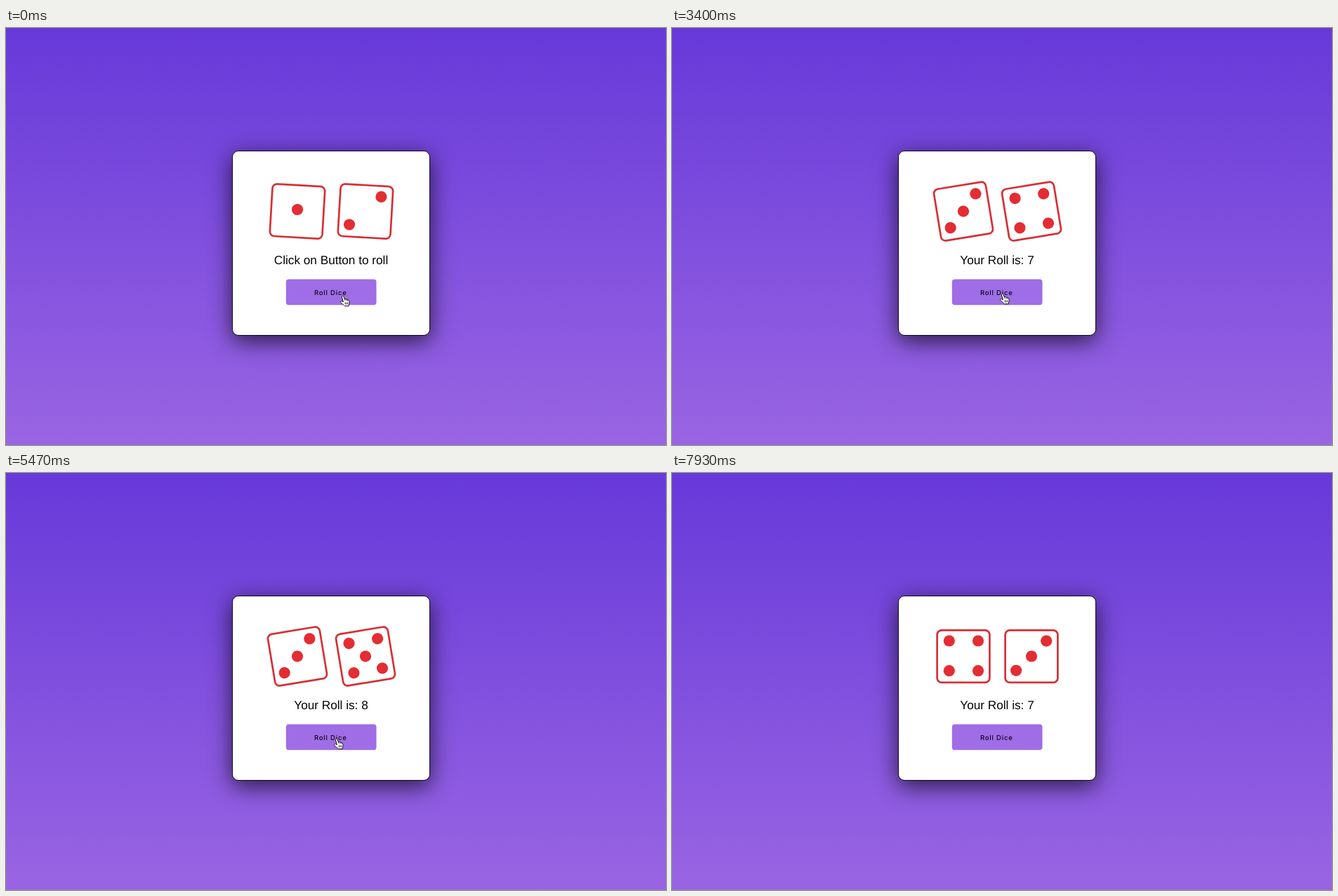
Write an HTML page that moves like this. It is 940 px wide and 595 px high and loops after 8000 ms.

```html
<!DOCTYPE html>
<html lang="en">
<head>
<meta charset="utf-8">
<title>Roll Dice</title>
<style>
  html, body { margin: 0; width: 100%; height: 100%; overflow: hidden; }
  body { position: relative; background: linear-gradient(#6739d9, #9965e3); }
  .card {
    position: absolute; left: 322px; top: 175px; width: 282px; height: 264px;
    box-sizing: border-box; border: 1.5px solid #120a1e; border-radius: 9px;
    background: #fff; box-shadow: 0 8px 32px rgba(0, 0, 0, .7);
  }
  svg { position: absolute; left: 0; top: 0; }
  text { text-rendering: geometricPrecision; }
  .result { font: 17.2px "Liberation Sans", Arial, sans-serif; text-anchor: middle; fill: #050308; }
  .label { font: 500 9.5px Inter, sans-serif; letter-spacing: .8px; fill: #0c0616; }
  .die rect { fill: #fff; stroke: #d53036; stroke-width: 2.7; }
  .die circle { fill: #e32d33; }
  .cursor path { stroke-linejoin: round; stroke-linecap: round; }
</style>
</head>
<body>
<div class="card"></div>
<svg width="940" height="595" viewBox="0 0 940 595">
  <g class="die"><rect x="-37.4" y="-37.2" width="74.8" height="74.6" rx="6.5"/><g></g></g>
  <g class="die"><rect x="-37.4" y="-37.2" width="74.8" height="74.6" rx="6.5"/><g></g></g>
  <text class="result" x="463" y="337"></text>
  <rect x="398.8" y="358.4" width="128.7" height="36.8" rx="4" fill="#9f6de6"/>
  <text class="label" x="439" y="380.8">Roll Dice</text>
  <g class="cursor">
    <g id="hand">
      <path transform="translate(-4.3 -.8)" fill="#fff" stroke="#111" d="M2.6 2.2C2.5.8 4.4.3 5 1.6L6.6 5.6C7.4 4.9 8.5 5.2 8.9 6 9.7 5.5 10.7 5.9 11 6.8 12 6.5 12.8 7 13 8 13.6 10 13.4 11.5 12.8 13L12.6 15.5H6.6C5.4 14 2.6 12 1 10.2.2 9 1.5 8 2.6 8.6L4.4 9.4Z"/>
      <path transform="translate(-4.3 -.8)" fill="none" stroke="#111" stroke-width=".8" d="M6.6 5.6L7.3 7.6M8.9 6L9.5 7.8M11 6.8L11.4 8.2M7.4 10.5V13M9.2 10.5V13M11 10.5V13"/>
    </g>
    <path id="arrow" fill="#000" stroke="#fff" d="M0 0V13.5L3.1 10.6 5.2 15.4 7.5 14.4 5.5 9.7H9.8Z"/>
  </g>
</svg>
<script>
  const LOOP = 8000, STEP = 1000 / 15, SHAKE = 1000, SWING = 400, TILT = 10;
  const CENTERS = [[415, 261.5], [512, 261.5]];

  // Each roll shakes the dice, then shows its faces.
  const FIRST = [1, 2];
  const ROLLS = [
    { start: -278, faces: [3, 4] },
    { start: 3189, faces: [3, 5] },
    { start: 5312, faces: [4, 3] }
  ];

  // Pointer tip: time, x, y
  const PATH = [
    [0, 480, 382], [1467, 480, 382], [1533, 483, 390], [1600, 505, 440],
    [1667, 549, 583], [1733, 565, 640], [2533, 606, 640], [2600, 602, 585],
    [2667, 575, 518], [2733, 535, 455], [2800, 500, 412], [2867, 479, 388],
    [2933, 471, 379], [6800, 471, 379], [6867, 474, 384], [6933, 486, 414],
    [7000, 508, 477], [7067, 540, 640], [LOOP, 540, 640]
  ];

  const diagonal = [[21.2, -21.9], [-21.9, 20.3]];
  const corners = [[-20.2, -22], [21, -22], [-20.2, 20.7], [21, 20.7]];
  const PIPS = {
    1: [[-.1, -2.5]],
    2: diagonal,
    3: [...diagonal, [0, 0]],
    4: corners,
    5: [...corners, [0, 0]]
  };

  const dice = [...document.querySelectorAll(".die")];
  const result = document.querySelector(".result");
  const cursor = document.querySelector(".cursor");
  const hand = document.getElementById("hand");
  const arrow = document.getElementById("arrow");
  const mix = (a, b, k) => a + (b - a) * k;

  // cubic-bezier(.25, .1, .25, 1)
  function ease(x) {
    const curve = (a, b, s) => 3 * a * s * (1 - s) ** 2 + 3 * b * s * s * (1 - s) + s ** 3;
    let lo = 0, hi = 1;
    for (let i = 0; i < 24; i++) {
      const mid = (lo + hi) / 2;
      if (curve(.25, .25, mid) < x) lo = mid; else hi = mid;
    }
    return curve(.1, 1, lo);
  }

  function tiltAt(t) {
    const roll = ROLLS.find(r => t >= r.start && t < r.start + SHAKE);
    if (!roll) return 0;
    const half = (t - roll.start) % SWING / SWING * 2;
    return half < 1 ? mix(TILT, -TILT, ease(half)) : mix(-TILT, TILT, ease(half - 1));
  }

  let shown;
  function showFaces(roll) {
    if (roll === shown) return;
    shown = roll;
    const faces = roll ? roll.faces : FIRST;
    dice.forEach((die, i) => {
      die.lastElementChild.innerHTML = PIPS[faces[i]]
        .map(([x, y]) => `<circle cx="${x}" cy="${y}" r="8.1"/>`).join("");
    });
    result.textContent = roll ? `Your Roll is: ${faces[0] + faces[1]}` : "Click on Button to roll";
  }

  function moveCursor(t) {
    const i = PATH.findIndex(p => p[0] > t);
    const [a, b] = [PATH[i - 1], PATH[i]];
    const k = (t - a[0]) / (b[0] - a[0]);
    const x = mix(a[1], b[1], k), y = mix(a[2], b[2], k);
    const over = x > 399 && x < 527 && y > 358 && y < 395;
    cursor.setAttribute("transform", `translate(${x} ${y})`);
    hand.style.display = over ? "" : "none";
    arrow.style.display = over ? "none" : "";
  }

  function draw(now) {
    // The motion runs at 15 pictures per second.
    const t = Math.floor((now % LOOP + 4) / STEP) * STEP % LOOP;
    showFaces(ROLLS.filter(r => t >= r.start + SHAKE).pop() || null);
    const tilt = tiltAt(t);
    dice.forEach((die, i) =>
      die.setAttribute("transform", `translate(${CENTERS[i]}) rotate(${tilt})`));
    moveCursor(t);
  }

  const begin = performance.now();
  function tick() {
    draw(performance.now() - begin);
    requestAnimationFrame(tick);
  }
  tick();
</script>
</body>
</html>
```
